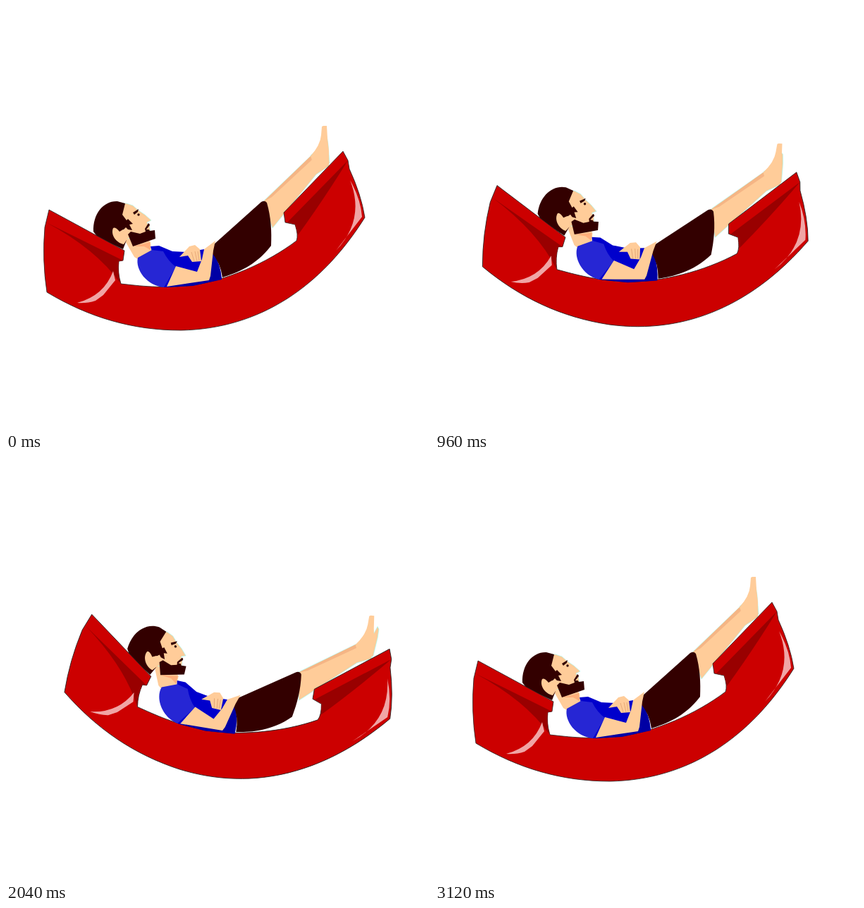
An HTML page that plays this animation: 600 by 600 pixels, repeating every 3160 ms.

```html
<!DOCTYPE html>
<html lang="en">
<head>
<meta charset="utf-8">
<title>Man in a hammock</title>
<style>
html, body { margin: 0; width: 100%; height: 100%; overflow: hidden; background: #fff; }
svg { display: block; width: 100vw; height: 100vh; }
.skin { fill: #fc9; }
.shade { fill: #f5b585; }
.hair { fill: #300; }
.red { fill: #c00; }
.fold { fill: #900; }
.shine { fill: #f0a5a5; }
.line { fill: none; stroke: #e0a070; stroke-width: .8; }
.rim { stroke: #8ff; stroke-width: .5; }
</style>
</head>
<body>
<svg viewBox="0 0 600 600">
<g id="swing">
  <!-- legs -->
  <path class="skin rim" d="M440 238L459 223L457 196L455 184L452 181L449 198L432 212Z"/>
  <path class="skin rim" d="M364 278L433 212L441 205L454 212L458 227L440 239L378 315Z"/>
  <path class="shade" d="M366 277L433 212L443 200Q441 212 432 220L377 271Z"/>
  <path id="foot" class="skin" d="M432 213Q446 197 447 183L448 171L450 170H455L456 188L458 206V226L447 234L436 224Z"/>

  <!-- head -->
  <path class="skin" d="M167 330L182 356L187 359L206 348L205 335L190 320Z"/>
  <path fill="#f96" opacity=".6" d="M181 341L204 335L205 346L196 341Z"/>
  <path class="skin rim" d="M165 280L171 280L180 283L188 290L197 296L206 304L200 307L203 312L205 319L190 328L172 330L160 300Z"/>
  <path class="hair" d="M169 280L158 277C139 276 123 294 124 320L130 328L166 345L171 332L166 318L170 314L173 317L179 318L175 310L180 309L173 302L171 304L165 296Z"/>
  <path class="skin" d="M152 315C148 324 156 336 167 338L173 329L174 319L166 317L161 320Q155 313 152 315Z"/>
  <path class="hair" d="M173 324L177 320L190 323L198 320L197 316L202 308L204 310L202 316L204 319L211 318L212 330L180 341Z"/>
  <path class="skin" d="M199 317L203 312L204 317Z"/>
  <path class="hair" d="M180 293L188 288L187 292L182 296Z"/>
  <circle class="hair" cx="188" cy="296" r="1.7"/>

  <!-- hammock -->
  <path class="red" stroke="#222" stroke-width=".8" d="M61 289L168 347L166 361L160 362Q158 378 163 394C190 397 220 401 265 396C312 389 370 365 412 333Q415 325 410 310L396 307L394 293L478 206L485 219L487 231Q504 268 509 300C447 399 359 458 248 460C180 460 118 442 58 406Q51 360 55 314Z"/>
  <path class="fold" d="M57 307L166 361L160 362Q158 378 162 393Q128 345 57 307Z"/>
  <path class="fold" d="M485 219L399 307L410 309L414 325Q449 277 485 219Z"/>
  <path class="shine" d="M152 376L155 389L138 410L127 418Q115 422 101 421Q139 411 152 376Z"/>
  <path class="shine" d="M488 247Q503 273 505 299L468 347Q510 303 488 247Z"/>

  <!-- shirt -->
  <path fill="#00c" d="M205 341L217 340L236 348L258 349L281 345L293 344L306 386L265 396L224 399L210 360Z"/>
  <path fill="#0000a4" d="M292 346Q305 366 306 388L265 397L228 399L240 391L286 388Z"/>
  <path fill="#2626d4" d="M207 346L187 357C183 374 200 397 224 399L241 370Q230 362 223 348Z"/>

  <!-- shorts -->
  <path class="hair" d="M292 350L295 338L362 278Q367 275 370 279C376 300 377 320 376 340C354 369 326 379 307 385Q304 364 292 350Z"/>

  <!-- arms -->
  <path class="skin" d="M241 369L271 377L278 359L281 345L297 333L294 347L290 383L288 389L228 398Z"/>
  <path class="skin" d="M246 356L260 341L268 339L275 345L277 362L264 363L258 354Z"/>
  <path class="line" d="M263 349L267 362M268 348L271 362M272 348L274 361"/>
</g>
</svg>
<script>
const swing = document.getElementById("swing");
const foot = document.getElementById("foot");
const STEP = 40, FRAMES = 79, HALF = 39;

// Back and forth, each way starting slowly and ending fast.
function sway(frame, half) {
  const turn = Math.floor(frame / half + 1e-6);
  const eased = 1 - Math.cos((frame / half - turn) * Math.PI / 2);
  return turn % 2 ? 1 - eased : eased;
}

function draw(now) {
  const frame = Math.floor(now / STEP) % FRAMES;
  swing.setAttribute("transform", `rotate(${20.2 * sway(frame, HALF)} 300.5 449)`);
  foot.setAttribute("transform", `rotate(${-14 * sway(frame, HALF / 4)} 440 222)`);
  requestAnimationFrame(draw);
}
draw(performance.now());
</script>
</body>
</html>
```
